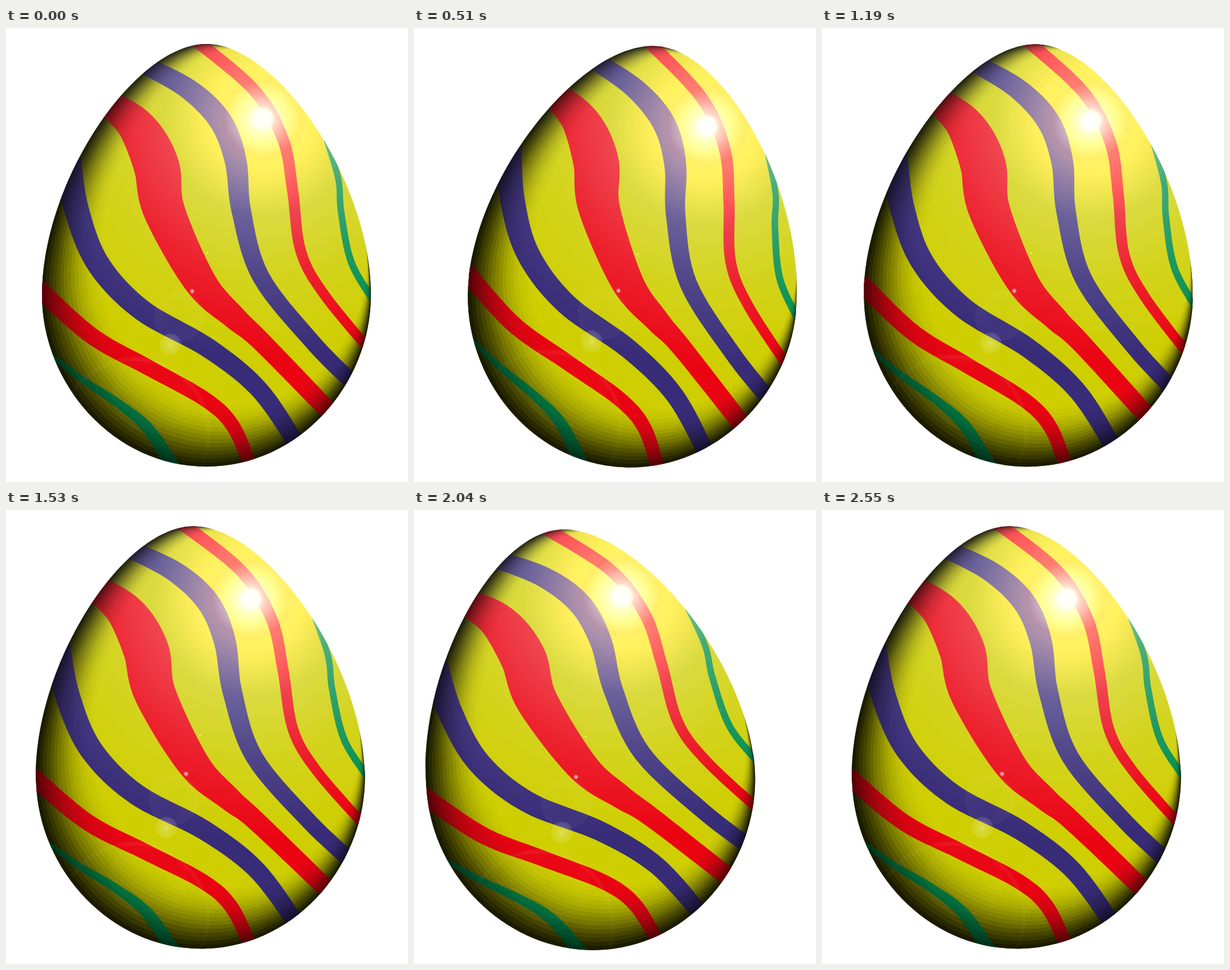
An HTML page with a canvas that plays this animation: 704 px wide and 795 px high, repeating every 2720 ms.

```html
<!DOCTYPE html>
<html lang="en">
<head>
<meta charset="utf-8">
<title>Rocking egg</title>
<style>
html, body { margin: 0; width: 100%; height: 100%; overflow: hidden; background: #fff; }
canvas { display: block; }
</style>
</head>
<body>
<canvas id="stage" width="704" height="795"></canvas>
<script>
const ctx = document.getElementById('stage').getContext('2d');
const PIVOT = [351, 767], LIGHT = [600, 90];
const RED = '#ea0412', BLUE = '#382c78', GREEN = '#008c4b';

const egg = new Path2D(`M351 28 C476 28 639 268 639 468 C639 623 514 768 351 768
  C188 768 63 623 63 468 C63 268 226 28 351 28Z`);

const mix = (a, b, t) => a + (b - a) * t;

// Point at t (0 to 1) on a smooth curve through the keys.
function along(keys, t) {
  const last = keys.length - 1;
  const i = Math.min(last - 1, Math.floor(t * last)), u = t * last - i;
  const key = k => keys[Math.max(0, Math.min(last, k))];
  const [a, b, c, d] = [i - 1, i, i + 1, i + 2].map(key);
  return [0, 1].map(n => b[n] + u / 2 * (c[n] - a[n]
    + u * (2 * a[n] - 5 * b[n] + 4 * c[n] - d[n]
    + u * (3 * (b[n] - c[n]) + d[n] - a[n]))));
}

// A ribbon along the keys: its width runs from start to end and may swell between.
function stripe(color, [start, end, swell = 0], ...keys) {
  const path = new Path2D(), steps = 60, far = [];
  for (let i = 0; i <= steps; i++) {
    const t = i / steps;
    const [x, y] = along(keys, t);
    const [x0, y0] = along(keys, Math.max(0, t - 0.01));
    const [x1, y1] = along(keys, Math.min(1, t + 0.01));
    const width = mix(start, end, t) + swell * Math.sin(Math.PI * t ** 0.6) ** 3;
    const k = width / 2 / Math.hypot(x1 - x0, y1 - y0);
    const nx = (y0 - y1) * k, ny = (x1 - x0) * k;
    path.lineTo(x + nx, y + ny);
    far.unshift([x - nx, y - ny]);
  }
  for (const p of far) path.lineTo(...p);
  return { color, path };
}

const stripes = [
  stripe(RED, [22, 17], [325, 16], [434, 108], [485, 195], [502, 285], [516, 390], [556, 465], [640, 568]),
  stripe(BLUE, [31, 28, 10], [236, 62], [318, 106], [375, 162], [402, 232], [412, 320], [446, 435], [536, 549], [612, 626]),
  stripe(RED, [46, 32, 38], [172, 126], [228, 172], [263, 240], [277, 320], [340, 445], [400, 507], [448, 550], [578, 684]),
  stripe(BLUE, [46, 29], [108, 230], [124, 320], [162, 414], [238, 494], [355, 561], [445, 635], [515, 738]),
  stripe(RED, [31, 23], [56, 455], [150, 539], [250, 595], [350, 651], [398, 698], [430, 772]),
  stripe(GREEN, [7, 25], [78, 572], [130, 613], [200, 660], [250, 703], [296, 774]),
  stripe(GREEN, [10, 13], [561, 195], [582, 265], [587, 323], [605, 411], [647, 482])
];

// Darkens the rim away from the light in nested steps.
function shade() {
  const steps = 16;
  const level = d => 0.36 + 0.64 * (1 - (1 - d) ** 2);
  for (let i = 0; i < steps; i++) {
    const d = (i + 1) / steps, sx = 1 - 0.19 * d, sy = 1 - 0.16 * d;
    const rim = new Path2D();
    rim.rect(0, 0, 704, 795);
    rim.addPath(egg, new DOMMatrix([sx, 0, 0, sy, LIGHT[0] * (1 - sx), LIGHT[1] * (1 - sy)]));
    ctx.fillStyle = `rgba(0,0,0,${1 - level(i / steps) / level(d)})`;
    ctx.fill(rim, 'evenodd');
  }
}

function glow(x, y, r, stops) {
  const g = ctx.createRadialGradient(x, y, 0, x, y, r);
  for (const [at, alpha, rgb = '255,255,255'] of stops) g.addColorStop(at, `rgba(${rgb},${alpha})`);
  ctx.fillStyle = g;
  ctx.beginPath();
  ctx.arc(x, y, r, 0, 7);
  ctx.fill();
}

function flare() {
  glow(449, 159, 420, [[0, 1], [0.035, 0.97], [0.055, 0.78], [0.11, 0.56],
    [0.16, 0.43, '255,235,235'], [0.2, 0.38], [0.4, 0.26], [0.65, 0.12], [1, 0]]);
  ctx.globalCompositeOperation = 'lighter';
  glow(449, 159, 170, [[0, 1, '40,20,0'], [0.45, 1, '40,20,0'], [1, 0, '40,20,0']]);
  ctx.globalCompositeOperation = 'source-over';
  glow(288, 554, 19, [[0, 0.4], [0.3, 0.22], [1, 0.1]]);
  glow(303, 505, 44, [[0, 0], [1, 0.04]]);
  glow(373, 348, 13, [[0, 0.08, '245,190,40'], [1, 0.05, '245,190,40']]);
  glow(255, 640, 70, [[0, 0], [1, 0.025]]);
  glow(326, 461, 5, [[0, 0.9], [0.4, 0.5], [1, 0]]);
  glow(353, 394, 2, [[0, 0.9], [1, 0.1]]);
  ctx.strokeStyle = 'rgba(255,235,190,0.05)';
  ctx.lineWidth = 7;
  ctx.beginPath();
  ctx.arc(225, 710, 130, 3.7, 6.75);
  ctx.stroke();
}

function draw(angle) {
  ctx.fillStyle = '#fff';
  ctx.fillRect(0, 0, 704, 795);
  ctx.save();
  ctx.translate(...PIVOT);
  ctx.rotate(angle);
  ctx.translate(-PIVOT[0], -PIVOT[1]);
  ctx.clip(egg);
  ctx.fillStyle = '#cece00';
  ctx.fill(egg);
  shade();
  for (const { color, path } of stripes) {
    ctx.fillStyle = color;
    ctx.fill(path);
  }
  flare();
  shade();
  ctx.restore();
}

// Sixteen held poses, two degrees apart, swinging eight degrees each way.
let shown = -1;
function tick() {
  const step = Math.floor(performance.now() / 170) % 16;
  if (step !== shown) {
    shown = step;
    const swing = 4 - Math.abs((step + 4) % 16 - 8);
    draw(swing * 2 * Math.PI / 180);
  }
  requestAnimationFrame(tick);
}
tick();
</script>
</body>
</html>
```
